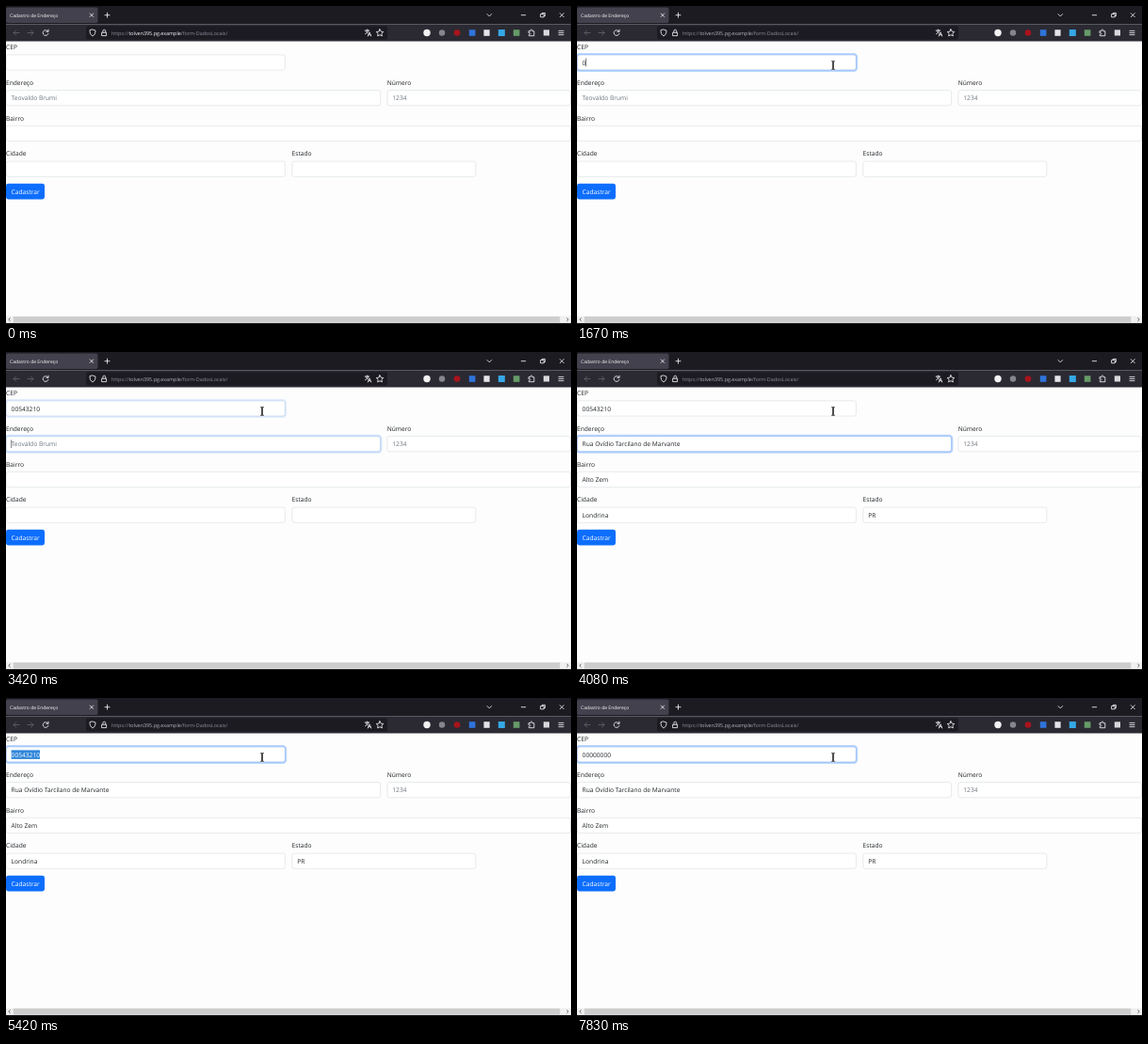
An HTML page that plays this animation: 600x338 px, repeating every 8 s.

```html
<!DOCTYPE html>
<html lang="pt-BR">
<head>
<meta charset="utf-8">
<title>Cadastro de Endereço</title>
<style>
html, body { margin: 0; width: 100%; height: 100%; overflow: hidden; background: #fdfdfd; }
svg { display: block; width: 600px; height: 338px; }
text { font: 6.65px "Open Sans", "Noto Sans", sans-serif; fill: #212529; text-rendering: geometricPrecision; white-space: pre; }
.hint { fill: #6c757d; }
.box { fill: #fff; stroke: #ced4da; stroke-width: .5; }
.ring { fill: none; stroke: #0d6efd; stroke-opacity: .27; stroke-width: 1.8; }
.edge { fill: none; stroke: #86b7fe; stroke-width: .6; }
.line { fill: none; stroke: #fbfbfe; stroke-width: .8; stroke-linecap: round; stroke-linejoin: round; }
.dim { stroke: #66656f; }
.small { font-size: 5px; fill: #fbfbfe; }
.url { font-size: 5.4px; fill: #8f8f9d; }
</style>
</head>
<body>
<svg viewBox="0 0 600 338">
  <rect width="600" height="338" fill="#fdfdfd"/>

  <!-- tab strip -->
  <rect width="600" height="19.5" fill="#1c1b22"/>
  <rect x="0" y="1.5" width="97.5" height="16.5" rx="1.8" fill="#42414d"/>
  <text class="small" x="4" y="11.7">Cadastro de Endereço</text>
  <path class="line" d="M89.2 8l3.4 3.4m0-3.4l-3.4 3.4M105 9.7h5M107.5 7.2v5"/>
  <path class="line" d="M511 8.6l2.3 2.3 2.3-2.3M547.3 9.7h4.4M588.3 7.7l4 4m0-4l-4 4"/>
  <path class="line" stroke-width=".6" d="M568 8.6h3.2v3.2H568zM569.2 8.4v-1h3.2v3.2h-1"/>

  <!-- toolbar -->
  <rect y="19.5" width="600" height="18" fill="#2b2a33"/>
  <rect x="85" y="21.3" width="320" height="14.3" rx="1.8" fill="#1c1b22"/>
  <path class="line dim" d="M14 28.5H8m2.6-2.6L8 28.5l2.6 2.6M23 28.5h6m-2.6-2.6l2.6 2.6-2.6 2.6"/>
  <path class="line" d="M44.6 27a2.9 2.9 0 1 0 .3 2.4M45 25.2V27.3H42.9"/>
  <path class="line" d="M92 25l3 1c0 3-.8 4.8-3 6-2.2-1.2-3-3-3-6z"/>
  <path class="line" d="M102 28.2h4.6v3.4H102zM102.9 28v-1.4a1.4 1.4 0 0 1 2.8 0V28"/>
  <text class="url" x="112" y="30.6">https://<tspan id="host">tolven395.pg.example</tspan>/form-DadosLocais/</text>
  <path class="line" d="M381.2 26h4.4M383.4 25v1m1.3 0c-.4 1.8-1.6 3-3.2 3.7M382.2 26.6c.5 1.2 1.2 1.9 2.2 2.5M384.3 32l1.7-4.2 1.7 4.2M385 30.7h2"/>
  <path class="line" d="M397 24.7l1.2 2.4 2.6.4-1.9 1.8.5 2.6-2.4-1.2-2.4 1.2.5-2.6-1.9-1.8 2.6-.4z"/>
  <circle cx="447" cy="28.5" r="3.7" fill="#f2f2f2"/>
  <circle cx="463" cy="28.5" r="3.2" fill="#85858f"/>
  <circle cx="479" cy="28.5" r="3.3" fill="#a8141c"/>
  <rect x="491.8" y="25.2" width="6.6" height="6.6" fill="#2f74dc"/>
  <rect x="507.4" y="25.2" width="6.2" height="6.6" fill="#e4e4e8"/>
  <rect x="522.8" y="25" width="7" height="7" fill="#35a7e6"/>
  <rect x="538.8" y="25.2" width="6.6" height="6.6" fill="#669b68"/>
  <path class="line" d="M555.3 26.7h1.7c-.6-2.4 2.4-2.4 1.8 0h2v5h-5.5v-1.5c2 .5 2-2.3 0-1.8z"/>
  <rect x="570.8" y="25.3" width="6.2" height="6.2" fill="#d8d8dc"/>
  <path class="line" d="M587 26.4h5M587 28.5h5M587 30.6h5"/>

  <!-- form -->
  <g id="form"></g>
  <rect y="188.8" width="41" height="16.6" rx="2.4" fill="#0d6efd"/>
  <text x="5.6" y="199.7" style="fill:#fff">Cadastrar</text>
  <rect id="pick" x="5.6" y="55.4" height="9.5" fill="#2f86d9"/>
  <g id="values"></g>
  <rect id="caret" width=".6" height="8.6" fill="#212529"/>

  <!-- scrollbar -->
  <rect y="329.6" width="600" height="7.4" fill="#f0f0f0"/>
  <rect x="7.8" y="330.1" width="580.4" height="6.4" fill="#cdcdcd"/>
  <path d="M4.6 331.6l-1.8 1.7 1.8 1.7M595.4 331.6l1.8 1.7-1.8 1.7" fill="none" stroke="#555" stroke-width=".9"/>
  <rect y="337" width="600" height="1" fill="#1c1b22"/>

  <!-- pointer -->
  <g id="mouse">
    <path id="arrow" d="M0 0v8l1.9-1.7 1.3 2.9 1.3-.6-1.3-2.8h2.5z" fill="#fff" stroke="#000" stroke-width=".5"/>
    <g id="beam" fill="none">
      <path d="M-1.7-4.3h1.2q.5 0 .5.6v7.4q0 .6-.5.6h-1.2M1.7-4.3H.5Q0-4.3 0-3.7v7.4q0 .6.5.6h1.2" stroke="#fff" stroke-width="1.7"/>
      <path d="M-1.7-4.3h1.2q.5 0 .5.6v7.4q0 .6-.5.6h-1.2M1.7-4.3H.5Q0-4.3 0-3.7v7.4q0 .6.5.6h1.2" stroke="#000" stroke-width=".9"/>
    </g>
  </g>
</svg>
<script>
const $ = id => document.getElementById(id);
const LOOP = 8000, HEIGHT = 16.7, PITCH = 37.76, TOP = 51.6;

// label, left, row, width, placeholder, filled value
const specs = [
  ['CEP', 0, 0, 296.6, '', ''],
  ['Endereço', 0, 1, 397.8, 'Teovaldo Brumi', 'Rua Ovídio Tarcilano de Marvante'],
  ['Número', 404.7, 1, 195.1, '1234', ''],
  ['Bairro', 0, 2, 599.8, '', 'Alto Zem'],
  ['Cidade', 0, 3, 296.6, '', 'Londrina'],
  ['Estado', 303.6, 3, 195.4, '', 'PR']
];

function add(parent, tag, attrs, text = '') {
  const el = document.createElementNS('http://www.w3.org/2000/svg', tag);
  for (const k in attrs) el.setAttribute(k, attrs[k]);
  el.textContent = text;
  return parent.appendChild(el);
}

const fields = specs.map(([label, x, row, w, hint, filled]) => {
  const y = TOP + row * PITCH;
  const frame = (parent, cls, grow) => add(parent, 'rect', {
    class: cls, x: x + .2 - grow, y: y + .2 - grow,
    width: w - .4 + 2 * grow, height: HEIGHT - .4 + 2 * grow, rx: 2.4 + grow
  });
  add($('form'), 'text', { x, y: y - 5.6 }, label);
  frame($('form'), 'box', 0);
  const glow = add($('form'), 'g', { opacity: 0 });
  frame(glow, 'ring', .9);
  frame(glow, 'edge', 0);
  const text = add($('values'), 'text', { x: x + 5.6, y: y + 11 });
  return { x, y, w, hint, filled, glow, text };
});
const [cep, street] = fields;

const CODE = '00543210';
const CLICK = 930, TAB = 3330, FILL = 3500, BACK = 4420;
const firstKeys = [1670, 1830, 2080, 2330, 2420, 2750, 2920, 3080];
const zeroKeys = [6000, 6250, 6420, 6580, 6830, 7000, 7120, 7250];

const clamp = v => Math.max(0, Math.min(1, v));
const fade = (t, start) => clamp((t - start) / 150);
const pressed = (keys, t) => keys.filter(k => k <= t).length;
const show = (el, on) => el.setAttribute('visibility', on ? 'visible' : 'hidden');

function setText(f, value) {
  const shown = value || f.hint;
  if (f.text.textContent !== shown) f.text.textContent = shown;
  f.text.setAttribute('class', value ? '' : 'hint');
}

function drawCaret(t) {
  const f = t >= TAB && t < BACK ? street : cep;
  const since = Math.max(CLICK, ...[TAB, FILL, ...firstKeys, ...zeroKeys].filter(k => k <= t));
  const selecting = t >= BACK && t < zeroKeys[0];
  show($('caret'), t >= CLICK && !selecting && (t - since) % 1000 < 500);
  const empty = f.text.getAttribute('class') === 'hint';
  const width = empty ? 0 : f.text.getComputedTextLength();
  $('caret').setAttribute('x', f.x + 5.5 + width);
  $('caret').setAttribute('y', f.y + 4);
}

function drawMouse(t) {
  const p = clamp((t - 250) / 580), e = 1 - (1 - p) ** 3;
  const x = 310 - 38 * e, y = 338 - 275 * e;
  const over = fields.some(f => x > f.x && x < f.x + f.w && y > f.y && y < f.y + HEIGHT);
  const seen = t >= 250;
  $('mouse').setAttribute('transform', `translate(${x} ${y})`);
  show($('arrow'), seen && !over);
  show($('beam'), seen && over);
}

function render(t) {
  const zeros = pressed(zeroKeys, t);
  setText(cep, zeros ? '0'.repeat(zeros) : CODE.slice(0, pressed(firstKeys, t)));
  for (const f of fields.slice(1)) setText(f, t >= FILL ? f.filled : '');

  cep.glow.setAttribute('opacity', fade(t, CLICK) - fade(t, TAB) + fade(t, BACK));
  street.glow.setAttribute('opacity', fade(t, TAB) - fade(t, BACK));

  const selected = t >= BACK && !zeros;
  show($('pick'), selected);
  if (selected) $('pick').setAttribute('width', cep.text.getComputedTextLength());
  cep.text.style.fill = selected ? '#fff' : '';

  $('host').style.fill = t < 250 ? '#fbfbfe' : '#b4b4bd';
  drawCaret(t);
  drawMouse(t);
}

const begin = performance.now();
function tick() {
  render((performance.now() - begin) % LOOP);
  requestAnimationFrame(tick);
}
tick();
</script>
</body>
</html>
```
